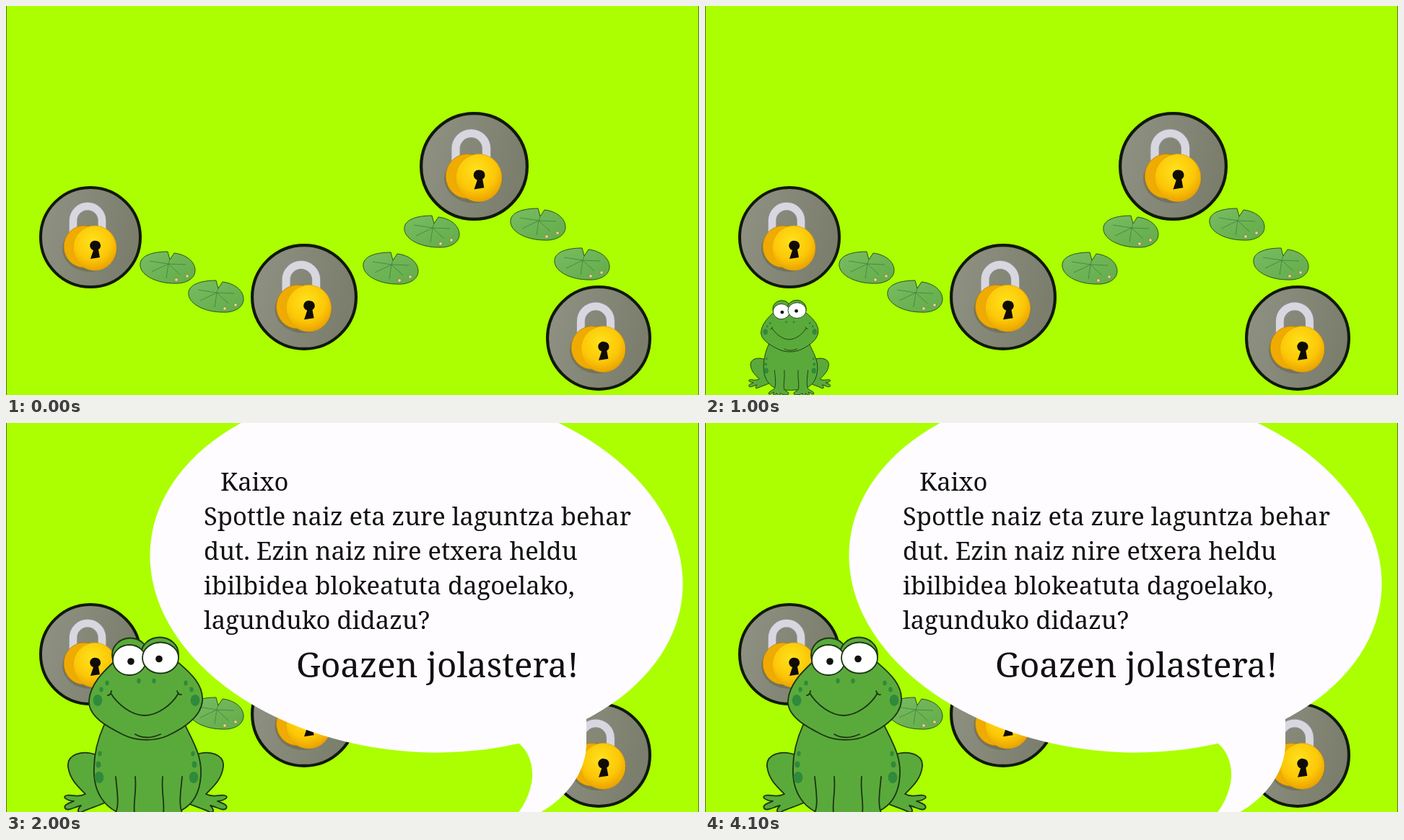
An HTML page for the animation above (5.1 s loop, 960 by 540 pixels).

```html
<!DOCTYPE html>
<html lang="eu">
<head>
<meta charset="utf-8">
<style>
  html, body { margin: 0; width: 100%; height: 100%; overflow: hidden; background: #abff00; }
  svg { display: block; width: 100vw; height: 100vh; }
  text { font: 300 34.5px "Noto Serif", serif; fill: #111; }
  text.big { font-size: 47.5px; font-weight: 500; }
  #frog { fill: #5aaa3b; stroke: #1c3612; stroke-width: 1.8; stroke-linecap: round; stroke-linejoin: round; }
  #frog .line { fill: none; }
  #frog .spot { fill: #2f8a3c; stroke: none; }
  #frog .eye { fill: #fff; }
  #frog .pupil { fill: #111; stroke: none; }
</style>
</head>
<body>
<svg viewBox="0 0 960 540">
  <defs>
    <linearGradient id="grey" x2="1" y2=".25">
      <stop stop-color="#909283"/><stop offset="1" stop-color="#7b7e6d"/>
    </linearGradient>
    <radialGradient id="gold" cx=".45" cy=".35" r=".7">
      <stop stop-color="#ffe21c"/><stop offset=".6" stop-color="#fcc707"/><stop offset="1" stop-color="#e79a00"/>
    </radialGradient>
    <linearGradient id="leaf" y2="1">
      <stop stop-color="#78bd62"/><stop offset="1" stop-color="#63ab49"/>
    </linearGradient>
    <path id="bow" d="M-24 -4V-23a20 20 0 0 1 40 0V-10" fill="none"/>

    <g id="lock">
      <circle r="69" fill="url(#grey)" stroke="#10190b" stroke-width="4"/>
      <use href="#bow" stroke="#8c8c90" stroke-width="12.5"/>
      <use href="#bow" stroke="#d8d7e0" stroke-width="10.5"/>
      <ellipse cx="-1" cy="16" rx="38" ry="32" fill="#41401f" opacity=".28"/>
      <ellipse cx="-9" cy="13" rx="28" ry="29" fill="#f0ab02" stroke="#bd8000" stroke-width=".8"/>
      <ellipse cx="6" cy="15" rx="30" ry="31" fill="url(#gold)" stroke="#e5a300" stroke-width=".8"/>
      <path d="M8 5a6.5 6.5 0 0 1 3 12L13 28L0 30L4 18A6.8 6.8 0 0 1 8 5Z" fill="#100c05"/>
    </g>

    <g id="pad" stroke="#28502a" stroke-linejoin="round">
      <path d="M0 -22L3 -11L9 -20C26 -18 38 -8 38 4S24 23 9 22C-14 22 -36 12 -38 -2S-22 -22 0 -22Z" fill="url(#leaf)"/>
      <path d="M3 -11L1 -5L-25 -9M1 -5L-22 6M1 -5L-2 15M1 -5L17 10M1 -5L25 -4" fill="none" stroke="#417f3b" stroke-width=".8"/>
      <g fill="#f3d09a" stroke="#77672b" stroke-width=".5">
        <circle cx="12" cy="17" r="2.3"/>
        <circle cx="27" cy="12" r="2.2"/>
      </g>
    </g>
  </defs>

  <rect width="960" height="540" fill="#abff00"/>
  <g id="scene"></g>

  <g id="frog">
    <path id="hind" d="M126 461C106 453 84 460 86 477S99 504 110 515C99 521 91 515 84 517S84 524 94 525C87 528 79 530 82 535S97 532 104 531C98 537 99 542 105 540C115 535 127 532 139 526L151 480Z"/>
    <use href="#hind" transform="translate(387) scale(-1 1)"/>
    <path d="M136 419C126 441 121 465 122 487C123 514 137 532 154 540Q196 552 238 540C258 532 269 514 270 487S258 441 248 419Z"/>
    <path id="front" d="M152 491C154 512 157 530 152 541C146 547 136 549 136 555S147 552 151 551C145 560 150 564 158 554C160 565 168 564 168 554C176 560 190 561 191 555S179 549 178 541C176 528 181 511 179 491"/>
    <use href="#front" transform="translate(396) scale(-1 1)"/>

    <ellipse cx="172" cy="322" rx="25" ry="23.5"/>
    <ellipse cx="213" cy="321" rx="26" ry="23.5"/>
    <path d="M149 332C136 344 116 363 115 386S145 424 163 433S207 442 224 434S270 410 272 386S253 345 238 332S166 323 149 332Z"/>
    <path d="M156 334Q193 302 232 334V345H156Z" stroke="none"/>
    <ellipse class="eye" cx="171" cy="329" rx="23" ry="21"/>
    <ellipse class="eye" cx="214" cy="326" rx="25" ry="21.5"/>
    <circle class="pupil" cx="173" cy="331" r="4.8"/>
    <circle class="pupil" cx="212" cy="327.5" r="4.8"/>
    <path class="line" d="M145 375C155 391 174 406 192 406S230 391 239 375M141 378Q145 378 146 372M237 372Q239 378 243 377M179 432Q194 441 214 432"/>
    <g id="spots"></g>
    <use href="#spots" transform="translate(389) scale(-1 1)"/>
  </g>

  <g id="speech">
    <g fill="#fffcff">
      <ellipse rx="370" ry="252.5" transform="translate(568.5 203.5) rotate(5.7)"/>
      <path d="M700 438C724 449 734 478 727 504Q723 523 709 542H738C772 523 802 490 804 448V405Z"/>
    </g>
    <g id="lines"></g>
    <text class="big" x="402" y="353">Goazen jolastera!</text>
  </g>
  <path d="M.5 0V540M959.5 0V540" stroke="#55781f"/>
</svg>
<script>
  const $ = id => document.getElementById(id);
  const use = (id, x, y, scale = 1) =>
    `<use href="#${id}" transform="translate(${x} ${y}) scale(${scale})"/>`;

  const locks = [[117, 321, 71], [413, 404, 74], [648.5, 222.5, 75.5], [821, 461, 73]];
  // Pads lie in pairs: the first one and the step to the second
  const pairs = [[224, 363, 67, 40], [533, 364, 57, -51], [737, 303, 61, 55]];
  $('scene').innerHTML =
    pairs.map(([x, y, dx, dy]) => use('pad', x, y) + use('pad', x + dx, y + dy)).join('') +
    locks.map(([x, y, r]) => use('lock', x, y, r / 71)).join('');

  // Left half of the spots; the right half is mirrored
  const spots = [[127, 385, 7], [132, 370, 3], [140, 361, 3], [184, 358, 3],
                 [129, 492, 7], [128, 474, 4], [130, 459, 3]];
  $('spots').innerHTML = spots.map(([x, y, r]) =>
    `<ellipse class="spot" cx="${x}" cy="${y}" rx="${r * .9}" ry="${r * 1.15}"/>`).join('');

  const lines = ['Kaixo', 'Spottle naiz eta zure laguntza behar', 'dut. Ezin naiz nire etxera heldu',
                 'ibilbidea blokeatuta dagoelako,', 'lagunduko didazu?'];
  $('lines').innerHTML = lines.map((line, i) =>
    `<text x="${i ? 274 : 297}" y="${94 + 48 * i}">${line}</text>`).join('');

  // The frog jumps to a new pose every half second: x, y, scale
  const poses = [null, [6.1, 367.5, .352], [19.7, 258.3, .504], [-12.4, 38.5, .894], [0, 0, 1]];
  const loop = 5100;

  function draw(now) {
    const step = Math.min(4, Math.floor(now % loop / 500));
    const pose = poses[step];
    $('frog').style.display = pose ? '' : 'none';
    $('speech').style.display = step === 4 ? '' : 'none';
    if (pose) {
      const [x, y, scale] = pose;
      $('frog').setAttribute('transform', `translate(${x} ${y}) scale(${scale})`);
    }
    requestAnimationFrame(draw);
  }
  draw(performance.now());
</script>
</body>
</html>
```
